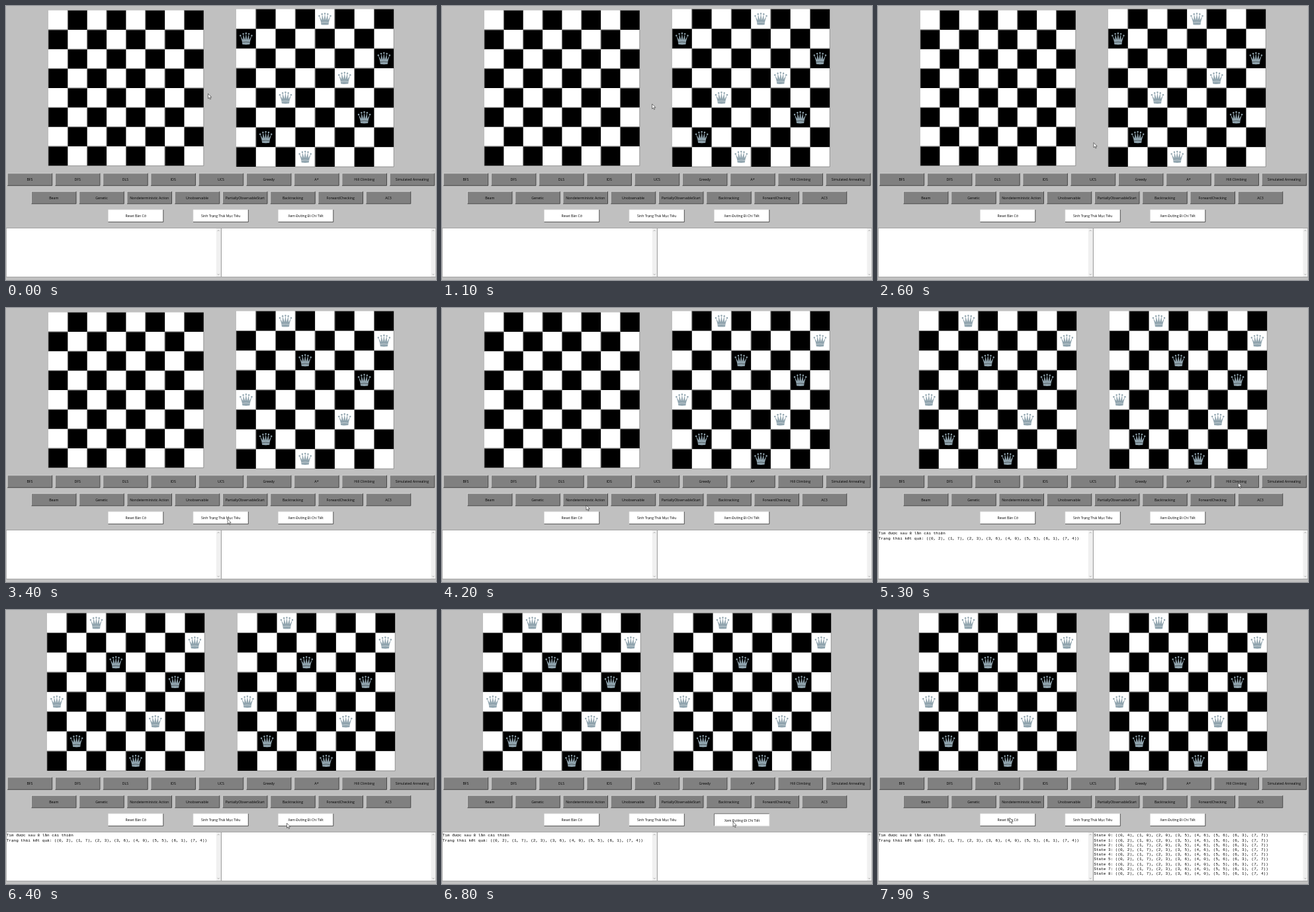
An HTML page that plays this animation: 650x414 px, repeating every 8000 ms.

```html
<!DOCTYPE html>
<html lang="vi">
<head>
<meta charset="utf-8">
<title>8 Queens</title>
<style>
  html, body { margin: 0; width: 100%; height: 100%; overflow: hidden; background: #c0c0c0; }
  svg { display: block; width: 650px; height: 414px; }
  .label { font-family: "Open Sans", "Noto Sans", sans-serif; text-anchor: middle; }
  .mono { font: 6.02px "Liberation Mono", monospace; white-space: pre; }
</style>
</head>
<body>
<svg id="stage" viewBox="0 0 650 414"></svg>
<script>
const LOOP = 8000, STEP = 100, CELL = 30;
const stage = document.getElementById("stage");

// Queen column for each row
const FIRST_GOAL = "40752613", GOAL = "27360514", START = "40056637";
const mix = (count, head, tail) => head.slice(0, count) + tail.slice(count);

// Pointer moves: start, end, x, y
const ORIGIN = [305.5, 132.5];
const MOVES = [
  [0, 200, 314.5, 132.5],
  [500, 900, 314.5, 148],
  [1000, 1300, 326.5, 148],
  [2500, 2600, 326, 206.5],
  [2600, 3400, 335, 319],
  [3400, 4200, 218, 298],
  [4300, 5200, 544.5, 264],
  [5800, 6400, 424.5, 322],
  [6400, 6700, 440, 320],
  [7400, 7900, 199, 314]
];

function add(parent, tag, attrs = {}, text) {
  const node = document.createElementNS("http://www.w3.org/2000/svg", tag);
  for (const key in attrs) node.setAttribute(key, attrs[key]);
  if (text !== undefined) node.textContent = text;
  parent.append(node);
  return node;
}

const rect = (parent, x, y, width, height, fill) => add(parent, "rect", { x, y, width, height, fill });
const line = (parent, d, stroke, width) => add(parent, "path", { d, stroke, "stroke-width": width, fill: "none" });

function makeQueen(parent) {
  const queen = add(parent, "g", { fill: "#90a4ae" });
  const tips = [-2, -1, 0, 1, 2].map(i => [i * 4.3, -8.2 + i * i * .9]);
  const spikes = tips.map(([x, y], i) => `L${x} ${y}` + (i < 4 ? `L${(i - 1.5) * 3.1} 1.8` : "")).join("");
  add(queen, "path", { d: `M-5.6 8.6L-6.2 4${spikes}L6.2 4L5.6 8.6Q0 9.6 -5.6 8.6Z` });
  for (const [cx, cy] of tips) add(queen, "circle", { cx, cy, r: 1.25 });
  const band = line(queen, "M-5.8 5.6Q0 4.2 5.8 5.6", "#fff", .45);
  return { queen, band };
}

function makeBoard() {
  const group = add(stage, "g");
  rect(group, 0, 0, 8 * CELL, 8 * CELL, "#fff");
  let edges = "";
  for (let i = 0; i < 64; i++) {
    const x = i % 8 * CELL, y = (i >> 3) * CELL;
    const dark = ((i >> 3) + i) % 2;
    if (dark) rect(group, x, y, CELL, CELL, "#000");
    // Relief: lit top-left on dark cells, shaded bottom-right on light ones
    edges += `M${x} ${y + CELL}` + (dark ? `V${y}H${x + CELL}` : `H${x + CELL}V${y}`);
  }
  line(group, edges, "#808080", .8);
  const queens = Array.from(GOAL, () => makeQueen(group));

  return (x, y, size, columns) => {
    group.setAttribute("transform", `translate(${x} ${y}) scale(${size / CELL})`);
    queens.forEach(({ queen, band }, row) => {
      queen.setAttribute("display", columns ? "inline" : "none");
      if (!columns) return;
      const col = +columns[row];
      queen.setAttribute("transform", `translate(${(col + .5) * CELL} ${(row + .5) * CELL})`);
      band.setAttribute("stroke", (row + col) % 2 ? "#000" : "#fff");
    });
  };
}

function makeButton(text, x, y, width, fill, fontSize) {
  const height = 18.5;
  rect(stage, x, y, width, height, fill);
  const light = line(stage, `M${x} ${y + height}V${y}H${x + width}`, "", .7);
  const shade = line(stage, `M${x} ${y + height}H${x + width}V${y}`, "", .9);
  const label = add(stage, "text", { class: "label", x: x + width / 2, y: y + 11.2, "font-size": fontSize }, text);
  return pressed => {
    light.setAttribute("stroke", pressed ? "#404040" : "#e0e0e0");
    shade.setAttribute("stroke", pressed ? "#e0e0e0" : "#404040");
    label.setAttribute("transform", pressed ? "translate(.5 .5)" : "");
  };
}

function makeTextBox(x, width) {
  rect(stage, x, 335.5, width, 74, "#fff").setAttribute("stroke", "#a4a4a4");
  const bar = x + width - 7.2, mid = bar + 3.4;
  rect(stage, bar, 336, 6.7, 73, "#f0f0f0");
  line(stage, `M${mid - 1.5} 340.2l1.5 -1.5l1.5 1.5M${mid - 1.5} 404.8l1.5 1.5l1.5 -1.5`, "#a0a0a0", .8);
}

function makeLines(x, lines) {
  const group = add(stage, "g", { class: "mono" });
  lines.forEach((text, i) => add(group, "text", { x, y: 342.3 + i * 7.2 }, text));
  return visible => group.setAttribute("display", visible ? "inline" : "none");
}

const asTuple = columns => `(${Array.from(columns, (col, row) => `(${row}, ${col})`).join(", ")})`;

const drawLeft = makeBoard();
const drawRight = makeBoard();

const press = {};
function makeRow(names, x, y, gap, width, fill, fontSize) {
  names.forEach((name, i) => press[name] = makeButton(name, x + i * gap, y, width, fill, fontSize));
}
makeRow(["BFS", "DFS", "DLS", "IDS", "UCS", "Greedy", "A*", "Hill Climbing", "Simulated Annealing"],
  2.2, 252.8, 72.25, 67.5, "#808080", 5.25);
makeRow(["Beam", "Genetic", "Nondeterministic Action", "Unobservable", "PartiallyObservableStart",
  "Backtracking", "ForwardChecking", "AC3"], 38.5, 280.3, 72.25, 67.5, "#808080", 5.25);
makeRow(["Reset Bàn Cờ", "Sinh Trạng Thái Mục Tiêu", "Xem Đường Đi Chi Tiết"],
  154.5, 307.8, 128.5, 83.3, "#fff", 5.1);
const pressTimes = { "Sinh Trạng Thái Mục Tiêu": 3300, "Hill Climbing": 5100, "Xem Đường Đi Chi Tiết": 6800 };

makeTextBox(.3, 324.7);
makeTextBox(325.5, 324.2);
const showResult = makeLines(.7, ["Tìm được sau 8 lần cải thiện", `Trạng thái kết quả: ${asTuple(GOAL)}`]);
const showStates = makeLines(326.3,
  Array.from({ length: 9 }, (_, k) => `State ${k}: ${asTuple(mix(k, GOAL, START))}`));

const pointer = add(stage, "path", {
  d: "M0 0V7.3L1.7 5.8L2.9 8.5L4.1 8L2.9 5.4H5.2Z", fill: "#fff", stroke: "#222", "stroke-width": .6
});

const smooth = p => p * p * (3 - 2 * p);

function pointerAt(t) {
  let [x, y] = ORIGIN;
  for (const [start, end, toX, toY] of MOVES) {
    const p = smooth(Math.min(1, Math.max(0, (t - start) / (end - start))));
    x += (toX - x) * p;
    y += (toY - y) * p;
  }
  return `translate(${x} ${y})`;
}

function render(t) {
  const settled = t >= 5300, solved = t >= 5200;
  // The new goal appears row by row; its last row comes one step late
  const goalRows = t < 3400 ? 0 : t < 3500 ? 7 : 8;
  if (settled) drawLeft(62, 4.7, 29.78, GOAL);
  else drawLeft(64, 6.6, 29.35, solved && GOAL);
  drawRight(settled ? 350 : 348, 4.7, 29.78, mix(goalRows, GOAL, FIRST_GOAL));
  showResult(solved);
  showStates(t >= 6900);
  for (const name in press) press[name](pressTimes[name] === t);
  pointer.setAttribute("transform", pointerAt(t));
}

let shown = -1;
function tick() {
  const t = Math.floor((performance.now() % LOOP) / STEP) * STEP;
  if (t !== shown) render(shown = t);
  requestAnimationFrame(tick);
}
tick();
</script>
</body>
</html>
```
